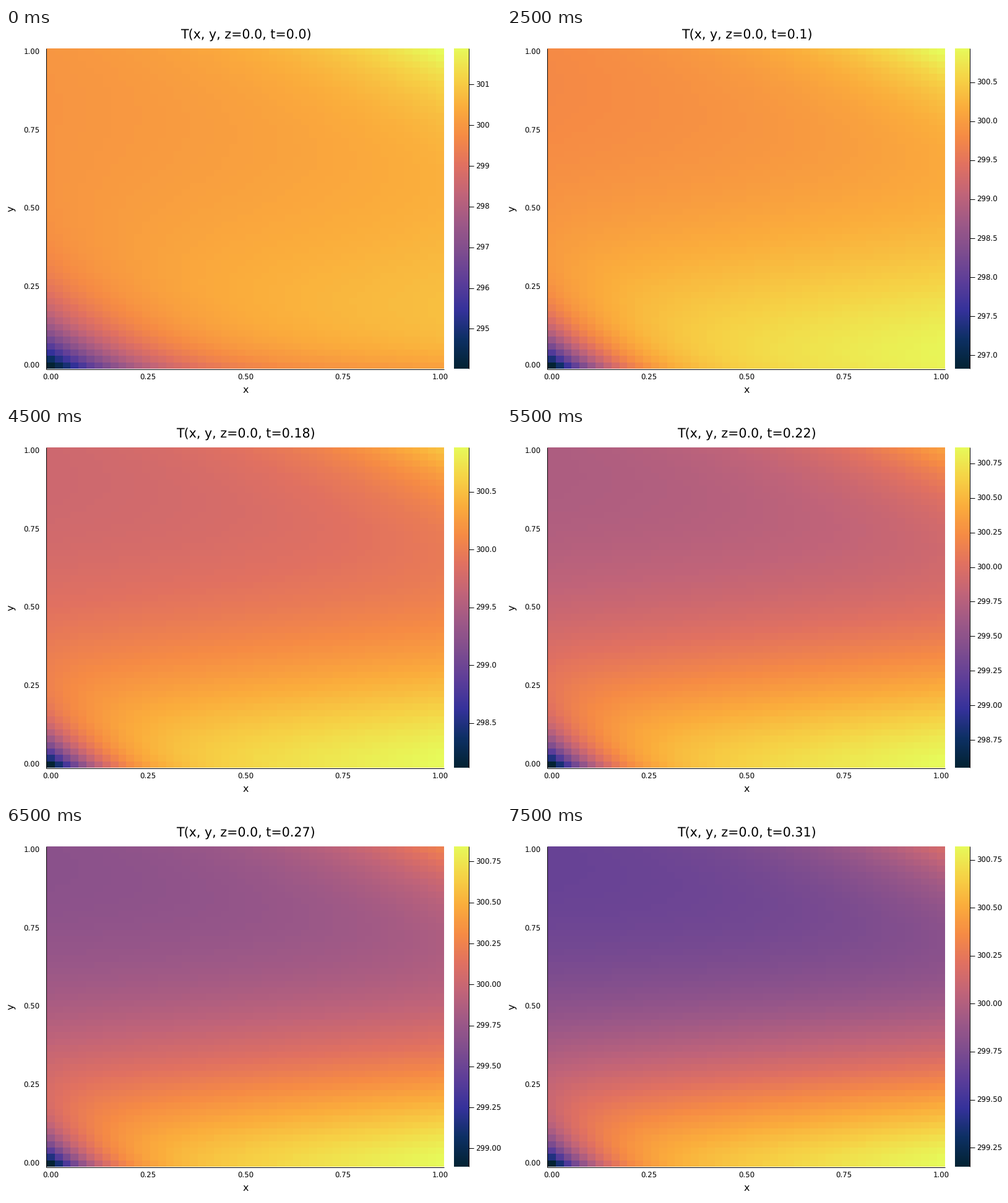
Recreate the animation shown at these times as a matplotlib script. Size 800 by 600 pixels, loop 8 s.

```python
import numpy as np
import matplotlib.pyplot as plt
from matplotlib.animation import FuncAnimation
from matplotlib.colors import LinearSegmentedColormap

N, FRAMES, STEP_MS = 50, 16, 500
DT = 1 / 49
L, R, TOP, BOT = 66, 708, 33, 551      # heatmap box in pixels
CL, CR = 724, 748                      # colour bar

thermal = LinearSegmentedColormap.from_list("thermal", [
    "#032333", "#0d3064", "#35329b", "#5d3e99", "#7e4d8f", "#9e5987",
    "#c16479", "#e17161", "#f68b45", "#fbad3c", "#f6d346", "#e7fa5a"], N=256)

plt.rcParams.update({"font.family": "DejaVu Sans", "text.hinting": "none"})

x, y = np.meshgrid(np.linspace(0, 1, N), np.linspace(0, 1, N))


def corner(dx, dy, a, b):
    """Peak of height 1 in a corner, fading over a and b."""
    return np.exp(-(dx / a + dy / b) ** 1.1)


def field(t):
    s = np.exp(-6 * t)
    top = -.44 + .32 * s + (.36 * s - .08) * x
    ridge = (.85 + .39 * x) * np.exp(-(y / .41) ** 1.5)
    cool_floor = 1.17 * np.exp(-16 * t - y / .13)
    hot = (.3 + 1.4 * s) * corner(1 - x, 1 - y, .36, .18)
    warm = top + ridge - cool_floor + hot

    # The cold corner relaxes towards 300
    lowest = -5.98 * np.exp(-(6.13 + .8 * t) * t)
    a = .1 + .095 * np.exp(-8 * t)
    return 300 + warm + (lowest - warm[0, 0]) * corner(x, y, a, .8 * a)


fig = plt.figure(figsize=(8, 6), dpi=100, facecolor="white")
ax = fig.add_axes([0, 0, 1, 1])
ax.axis("off")


def label(px, py, s, size, **kw):
    kw = {"ha": "center", "va": "baseline", **kw}
    return ax.text(px, py, s, fontsize=size * .72, color="black", **kw)


def line(xs, ys):
    return ax.plot(xs, ys, color="black", lw=.72, solid_capstyle="butt")[0]


def image(data, x0, x1):
    return ax.imshow(data, cmap=thermal, origin="lower", aspect="auto",
                     interpolation="nearest", extent=(x0, x1, BOT, TOP))


heat = image(field(0), L, R)
image(np.linspace(0, 1, 256)[:, None], CL, CR)
ax.set(xlim=(0, 800), ylim=(600, 0))

line([L - 1, L - 1], [TOP, BOT + 1])
line([L - 1, R], [BOT + 1, BOT + 1])
line([CR, CR], [TOP, BOT])

for v in np.linspace(0, 1, 5):
    pos = (.5 + v * (N - 1)) / N
    label(L + (R - L) * pos, 569, f"{v:.2f}", 11.7)
    label(54.5, BOT + (TOP - BOT) * pos + 4.3, f"{v:.2f}", 11.7, ha="right")
label(387, 590.5, "x", 16)
label(16.5, 292, "y", 16, rotation=90, ha="right", va="center")
title = label(387.5, 18, "", 20.6)

ticks = [(line([CR, CR + 8], [0, 0]), label(759, 0, "", 11.7, ha="left"))
         for _ in range(14)]


def draw(i):
    t = i * DT
    T = field(t)
    lo, hi = T.min(), T.max()
    heat.set_data(T)
    heat.set_clim(lo, hi)
    title.set_text(f"T(x, y, z=0.0, t={round(t, 2)})")

    span = hi - lo
    step, digits = (1, 0) if span > 5 else (.5, 1) if span > 2.4 else (.25, 2)
    vals = np.arange(np.ceil(lo / step), np.floor(hi / step) + 1) * step
    for k, (mark, text) in enumerate(ticks):
        on = k < len(vals)
        mark.set_visible(on)
        text.set_visible(on)
        if on:
            py = BOT - (vals[k] - lo) / span * (BOT - TOP)
            mark.set_ydata([py, py])
            text.set_y(py + 4.3)
            text.set_text(f"{vals[k]:.{digits}f}")
    return []


anim = FuncAnimation(fig, draw, frames=FRAMES, init_func=lambda: draw(0),
                     interval=STEP_MS, repeat=True, repeat_delay=0, blit=False)
plt.show()
```
